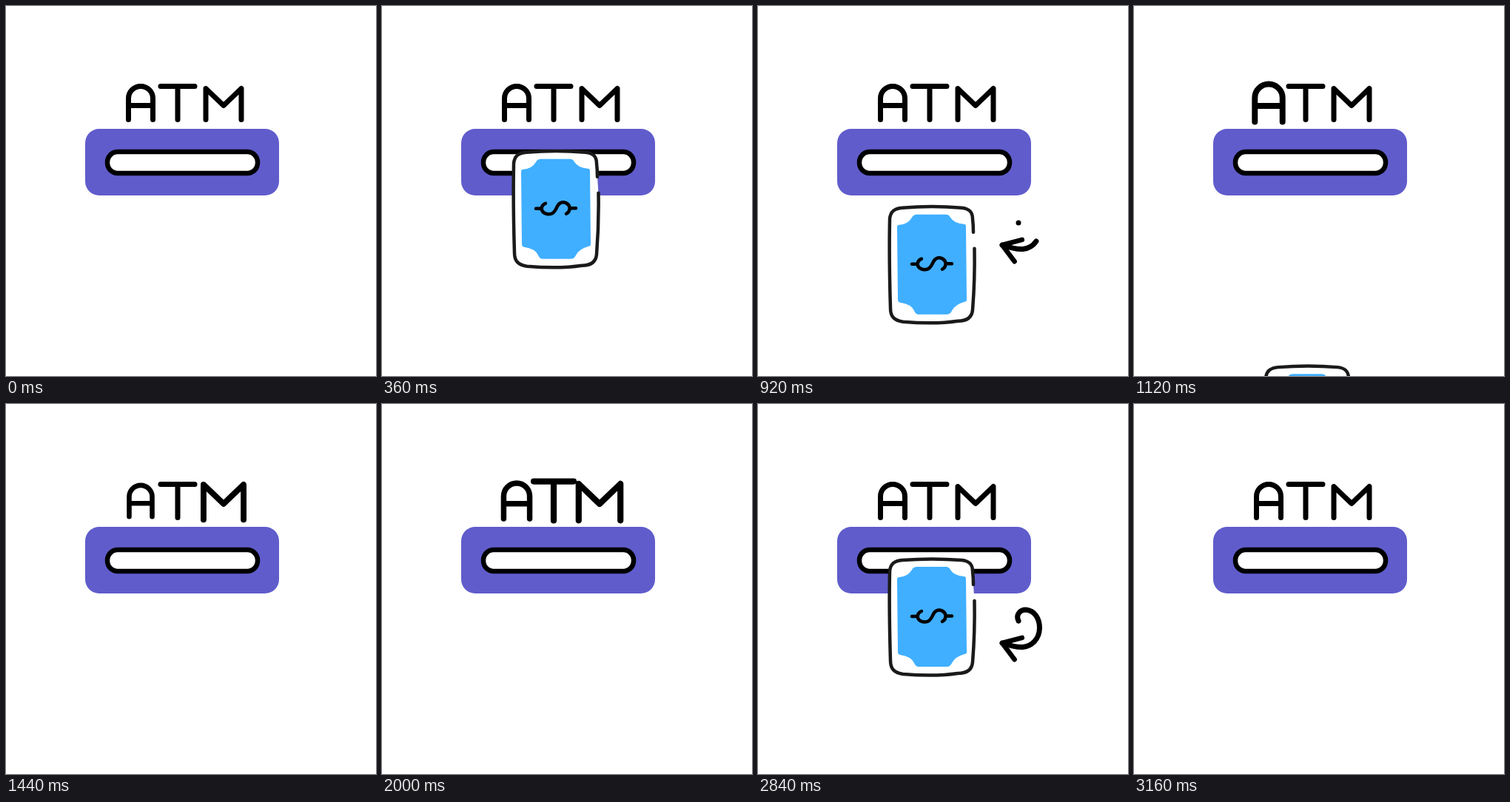
Animation of 500 by 500 pixels, one loop 3.24 s. Source, as an HTML page:

```html
<!DOCTYPE html>
<html lang="en">
<head>
<meta charset="utf-8">
<title>ATM</title>
<style>
  html, body { margin: 0; width: 100%; height: 100%; overflow: hidden; background: #fff; }
  svg { display: block; width: 100vw; height: 100vh; }
  .line { fill: none; stroke: #000; stroke-width: 7; stroke-linecap: round; stroke-linejoin: round; }
</style>
</head>
<body>
<svg viewBox="0 0 500 500">
  <clipPath id="mouth"><rect y="194" width="500" height="306"/></clipPath>

  <rect x="107" y="166" width="262" height="90" rx="19" fill="#605ccb"/>
  <rect x="137" y="197" width="203" height="29" rx="14" fill="#fff" stroke="#000" stroke-width="6.5"/>

  <g class="line">
    <path class="letter" d="M165.5 153.5V125a16.5 16.5 0 0 1 33 0V153.5M165.5 134.5H198.5"/>
    <path class="letter" d="M209 108.5H255M232 108.5V153.5"/>
    <path class="letter" d="M270 153.5V111.5L294 134.5L318 111.5V153.5"/>
  </g>

  <g clip-path="url(#mouth)">
    <g id="bill">
      <path fill="#fff" stroke="#1a1a1a" stroke-width="4.5" stroke-linecap="round"
        d="M292.5 252C293 280 292 310 290 335C289 346 281 350 270 350C250 353 220 353 196 351
           C184 349 179 344 179 333C178 300 177 260 178 212C179 202 184 198 195 197
           C220 195 250 195 275 197C286 198 290 203 290 212C291 220 291 226 291 230"/>
      <path fill="#40afff"
        d="M188 223Q188 220 191 220Q203 219 208 210Q210 206 215 206L254 206Q258 206 260 210
           Q265 218 278 219Q281 219 281 222L282 321Q282 324 279 324Q267 327 262 336
           Q260 341 255 341L217 341Q213 341 211 336Q207 327 192 325Q189 324 189 321Z"/>
      <path class="line" style="stroke-width:4.5"
        d="M208 273H216M254 272.5H262M221 266C216 268 214 273 217 277C220 281 228 282 232 278
           C237 273 236 268 241 265.5C246 263 252 266 253.5 271C254 275 253 278 249 280"/>
    </g>
  </g>

  <g id="arrow" class="line">
    <path id="tail" d="M352 293C348 285 354 278 362 278C374 279 380.500 290 380.500 303C380 318 370 327 358 328.500C349 329 340 326.500 330 323"/>
    <path id="head" d="M-23 -15.500L0 0L-23 15.500" stroke-width="6.500"/>
  </g>
</svg>
<script>
const $ = id => document.getElementById(id);
const letters = [...document.querySelectorAll('.letter')];
const centers = [[182, 131], [232, 131], [294, 132]];
const LOOP = 3240, STEP = 40, CYCLE = 2000;
const tail = $('tail'), length = tail.getTotalLength();

const ramp = (t, from, to) => Math.min(1, Math.max(0, (t - from) / (to - from)));
const smooth = p => (1 - Math.cos(Math.PI * p)) / 2;

// Grow, dip below full size, settle.
const pulse = t => 1 + 0.19 * Math.sin(ramp(t, 0, 160) * Math.PI / 2)
  - 0.25 * smooth(ramp(t, 160, 400)) + 0.06 * smooth(ramp(t, 400, 520));

// Slide out, pull back into the slot, drop off the stage.
function billOffset(t) {
  if (t < 670) return -160 + 225 * (1 - (1 - ramp(t, 90, 670)) ** 2);
  if (t < 810) return 65 * (1 - smooth(ramp(t, 670, 810)));
  return 0.168 * (t - 810) ** 1.3;
}

function drawArrow(t) {
  const end = length * smooth(ramp(t, 440, 800));
  const start = length * ramp(t, 840, 970) ** 1.1;
  $('arrow').style.display = end > 0 && start < length ? '' : 'none';
  tail.setAttribute('stroke-dasharray', `0 ${start} ${Math.max(0, end - start)} ${length * 2}`);
  const tip = tail.getPointAtLength(end);
  const a = tail.getPointAtLength(Math.max(0, end - 1));
  const b = tail.getPointAtLength(Math.min(length, end + 1));
  const angle = Math.atan2(b.y - a.y, b.x - a.x) * 180 / Math.PI;
  $('head').setAttribute('transform', `translate(${tip.x} ${tip.y}) rotate(${angle})`);
}

function draw(t) {
  letters.forEach((letter, i) => {
    const [x, y] = centers[i];
    const scale = pulse(t - (t < 1720 + i * 80 ? 1040 : 1720) - i * 80);
    letter.setAttribute('transform', `translate(${x} ${y}) scale(${scale}) translate(${-x} ${-y})`);
  });
  const u = t % CYCLE;
  $('bill').style.display = u >= 80 && u < 1160 ? '' : 'none';
  $('bill').setAttribute('transform', `translate(0 ${billOffset(u)})`);
  drawArrow(u);
}

const began = performance.now();
function tick() {
  const t = (performance.now() - began) % LOOP;
  draw(Math.floor(t / STEP) * STEP);
  requestAnimationFrame(tick);
}
tick();
</script>
</body>
</html>
```
